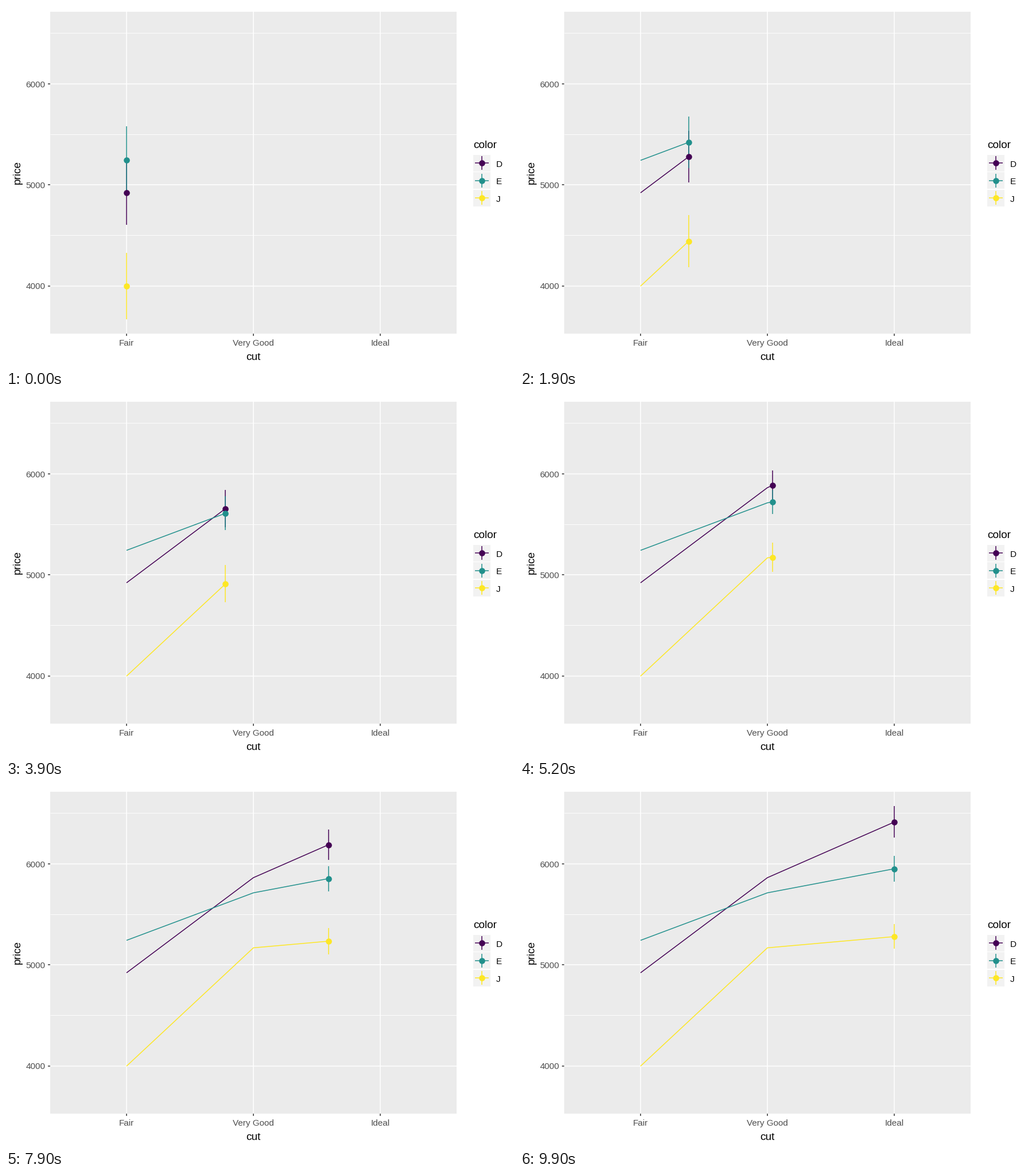
A matplotlib script for the animation above (10000 ms loop, 885x632 px).

```python
import matplotlib.pyplot as plt
import numpy as np
from matplotlib.animation import FuncAnimation
from matplotlib.patches import Rectangle

W, H, DPI = 885, 632, 100
PT = 72 / DPI  # points per pixel
LINE = 1.5 * PT
DOT = 10.6 * PT
LEFT, RIGHT, TOP, BOTTOM = 77, 784.5, 9.5, 571.5
FRAMES, KNEE = 100, 50

cuts = ["Fair", "Very Good", "Ideal"]
# level: (colour, mean price per cut, half interval per cut)
series = {
    "D": ("#440154", (4920, 5861, 6411), (317, 147, 156)),
    "E": ("#21908C", (5241, 5711, 5949), (337, 119, 129)),
    "J": ("#FDE725", (3997, 5167, 5278), (327, 144, 122)),
}

plt.rcParams["font.family"] = "Liberation Sans"
fig = plt.figure(figsize=(W / DPI, H / DPI), dpi=DPI, facecolor="white")
ax = fig.add_axes([0, 0, 1, 1])
ax.set_xlim(0, W)
ax.set_ylim(H, 0)
ax.axis("off")


def px(cut):
    return 210 + 221 * np.asarray(cut)


def py(price):
    return 312 - 0.1765 * (np.asarray(price) - 5000)


def box(x0, y0, x1, y1, color):
    ax.add_patch(Rectangle((x0, y0), x1 - x0, y1 - y0, fc=color, lw=0, zorder=0))


def line(xs, ys, color, width=LINE, z=1):
    return ax.plot(xs, ys, color=color, lw=width, zorder=z,
                   solid_capstyle="butt", solid_joinstyle="round")[0]


def dot(x, y, color):
    return ax.plot([x], [y], "o", color=color, ms=DOT, mew=0, zorder=5)[0]


def text(x, y, s, size, color="black", ha="center", rotation=0):
    ax.text(x, y, s, fontsize=size * PT, color=color, ha=ha, va="baseline",
            rotation=rotation, rotation_mode="anchor")


# panel, grid and axes
box(LEFT, TOP, RIGHT, BOTTOM, "#EBEBEB")
for price in (4500, 5500, 6500):
    line([LEFT, RIGHT], [py(price)] * 2, "white", 0.9 * PT)
for price in (4000, 5000, 6000):
    y = py(price)
    line([LEFT, RIGHT], [y, y], "white")
    line([LEFT - 4.5, LEFT], [y, y], "#333333")
    text(68.5, y + 6, str(price), 15.3, "#4D4D4D", "right")
for i, cut in enumerate(cuts):
    x = px(i)
    line([x, x], [TOP, BOTTOM], "white")
    line([x, x], [BOTTOM, BOTTOM + 4.5], "#333333")
    text(x, 593, cut, 15.3, "#4D4D4D")
text(430.5, 618, "cut", 19)
text(25, 290.5, "price", 19, rotation=90)

# legend
text(814, 248, "color", 19, ha="left")
for i, (level, (color, _, _)) in enumerate(series.items()):
    y = 274.2 + 30.6 * i
    box(814, y - 14.6, 843.5, y + 14.6, "#F2F2F2")
    line([817, 841], [y, y], color, z=3)
    line([829, 829], [y - 12, y + 12], color, z=3)
    dot(829, y, color)
    text(853.5, y + 6.5, level, 15.3, ha="left")

trails, bars, dots = [], [], []
for color, _, _ in series.values():
    trails.append(line([], [], color, z=3))
    bars.append(line([], [], color, z=4))
    dots.append(dot(0, 0, color))


def update(frame):
    pos = np.interp(frame, [0, KNEE, FRAMES - 1], [0, 1, 2])
    past = [i for i in range(3) if i < pos]
    x = px(pos)
    for (_, mean, half), trail, bar, point in zip(series.values(), trails, bars, dots):
        m = np.interp(pos, range(3), mean)
        h = np.interp(pos, range(3), half)
        trail.set_data(px(past + [pos]), py([mean[i] for i in past] + [m]))
        bar.set_data([x, x], py([m - h, m + h]))
        point.set_data([x], [py(m)])
    return trails + bars + dots


anim = FuncAnimation(fig, update, frames=FRAMES, interval=100,
                     repeat=True, repeat_delay=0, blit=False)
plt.show()
```
